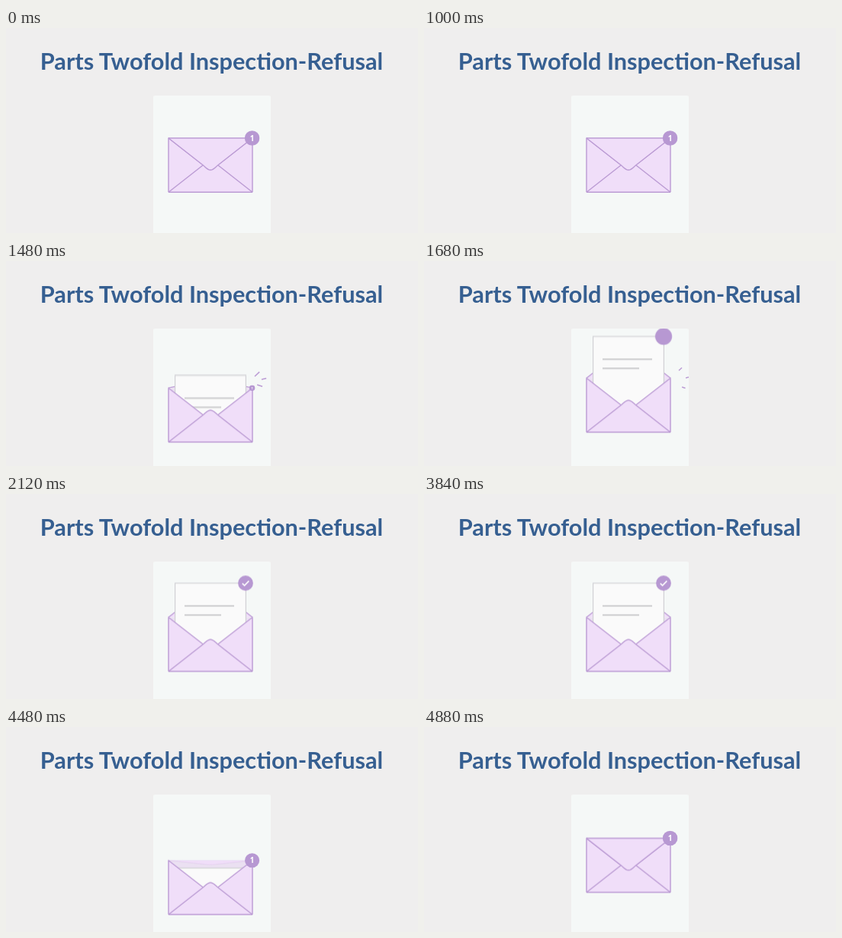
Animation, 540 px wide and 270 px high, one loop 4920 ms. Source, as an HTML page without scripts:

```html
<!DOCTYPE html>
<html lang="en">
<head>
<meta charset="utf-8">
<title>Envelope</title>
<style>
html, body { margin: 0; width: 100%; height: 100%; overflow: hidden; background: #efeeee; }
svg { display: block; width: 540px; height: 270px; }
.title { font: bold 30.7px Lato, sans-serif; fill: #365f91; text-anchor: middle; }
.num { font: bold 10px "Open Sans", sans-serif; fill: #fff; text-anchor: middle; }
.paper { fill: #f0def9; stroke: #bb9bd4; stroke-width: 1.4; stroke-linejoin: round; }
.dot { fill: #b798d2; }
.sheet { fill: #fafafa; stroke: #d0d0d4; stroke-width: 1.2; }
.rule { stroke: #cdcdcf; stroke-width: 2; }
.tick { fill: none; stroke: #fff; stroke-width: 1.6; stroke-dasharray: 100 200; }
.ray { fill: none; stroke: #bb9bd4; stroke-width: 1.5; stroke-dasharray: 0 200; animation: burst 4.92s linear infinite; }
#flap { vector-effect: non-scaling-stroke; }

/* opening plays forward, then the same motion closes it */
.env, .letter, .front, .back, .count, .done, .tick {
  animation: 2.46s linear -4.42s infinite alternate;
}
.env { animation-name: env; }
.letter { animation-name: letter; }
.front { animation-name: front; }
.back { animation-name: back; }
.count { animation-name: count; }
.done { animation-name: done; }
.tick { animation-name: tick; }

@keyframes env {
  0% { transform: translateY(0); }
  20.33% { transform: translateY(0); animation-timing-function: cubic-bezier(.37, 0, .63, 1); }
  34.15% { transform: translateY(48.5px); animation-timing-function: ease-in; }
  38.21% { transform: translateY(30.4px); animation-timing-function: ease-out; }
  45.5% { transform: translateY(7.2px); animation-timing-function: ease-in-out; }
  54.5% { transform: translateY(20px); animation-timing-function: ease-in-out; }
  64.5%, 100% { transform: translateY(17.4px); }
}
@keyframes letter {
  0% { transform: translateY(10px); }
  38.21% { transform: translateY(10px); animation-timing-function: cubic-bezier(.16, .45, .5, 1); }
  47% { transform: translateY(-55px); animation-timing-function: ease-in-out; }
  62%, 100% { transform: translateY(-45px); }
}
@keyframes front {
  0%, 34.15% { transform: scaleY(1); stroke-opacity: 1; }
  38.8%, 100% { transform: scaleY(0); stroke-opacity: 0; }
}
@keyframes back {
  0% { transform: scaleY(0); }
  38.8% { transform: scaleY(0); animation-timing-function: ease-out; }
  45%, 100% { transform: scaleY(-1); }
}
@keyframes count {
  0%, 38.1% { transform: scale(1); }
  41%, 100% { transform: scale(0); }
}
@keyframes done {
  0%, 43.5% { transform: scale(0); }
  47.9% { transform: scale(1.12); }
  53%, 100% { transform: scale(1); }
}
@keyframes tick {
  0%, 50% { stroke-dashoffset: 101; }
  56%, 100% { stroke-dashoffset: 0; }
}
@keyframes burst {
  0%, 29.27% { stroke-dasharray: 0 200; stroke-dashoffset: 0; }
  30.89% { stroke-dasharray: 80 200; stroke-dashoffset: 0; }
  34.15% { stroke-dasharray: 27 200; stroke-dashoffset: -53; }
  34.96%, 100% { stroke-dasharray: 0 200; stroke-dashoffset: -80; }
}
</style>
</head>
<body>
<svg viewBox="0 0 540 270">
  <defs>
    <clipPath id="panel"><rect x="193" y="89" width="154" height="181"/></clipPath>
    <clipPath id="slot"><rect x="0" y="-110" width="120" height="180"/></clipPath>
    <path id="flap" d="M0 0L46 36.2C50 40 51.5 42 55 42S60 40 64 36.2L110 0"/>
  </defs>

  <rect width="540" height="270" fill="#efeeee"/>
  <text class="title" x="269.5" y="55">Parts Twofold Inspection-Refusal</text>

  <rect x="193" y="89" width="154" height="190" rx="2" fill="#f5f8f7"/>
  <g clip-path="url(#panel)">
    <g id="side">
      <path class="ray" pathLength="100" d="M326 152L341 137.6"/>
      <path class="ray" pathLength="100" d="M335 156L350 152.3"/>
      <path class="ray" pathLength="100" d="M329.2 163L345.9 168.6"/>
    </g>
    <use href="#side" transform="translate(536 0) scale(-1 1)"/>

    <g transform="translate(213 145)">
      <g class="env">
        <g class="back"><use href="#flap" class="paper"/></g>
        <path d="M0 0H110L55 43Z" fill="#ebe0f2"/>

        <g clip-path="url(#slot)">
          <g class="letter">
            <rect class="sheet" x="8.6" width="92.8" height="100"/>
            <path class="rule" d="M21 30H86M21 42H69"/>
            <g transform="translate(101 0)">
              <g class="done">
                <circle class="dot" r="9.9"/>
                <path class="tick" pathLength="100" d="M-4.3 .3L-1.4 3.1L4.4 -2.9"/>
              </g>
            </g>
          </g>
        </g>

        <path class="paper" d="M0 71.2V0L55 43L110 0V71.2"/>
        <use href="#flap" class="paper" transform="translate(0 71.2) scale(1 -1)"/>
        <path class="paper" d="M0 71.2H110"/>
        <g class="paper front">
          <use href="#flap"/>
          <path d="M0 0H110"/>
        </g>

        <g transform="translate(109.6 0)">
          <g class="count">
            <circle class="dot" r="9.8"/>
            <text class="num" y="3.7">1</text>
          </g>
        </g>
      </g>
    </g>
  </g>
</svg>
</body>
</html>
```
